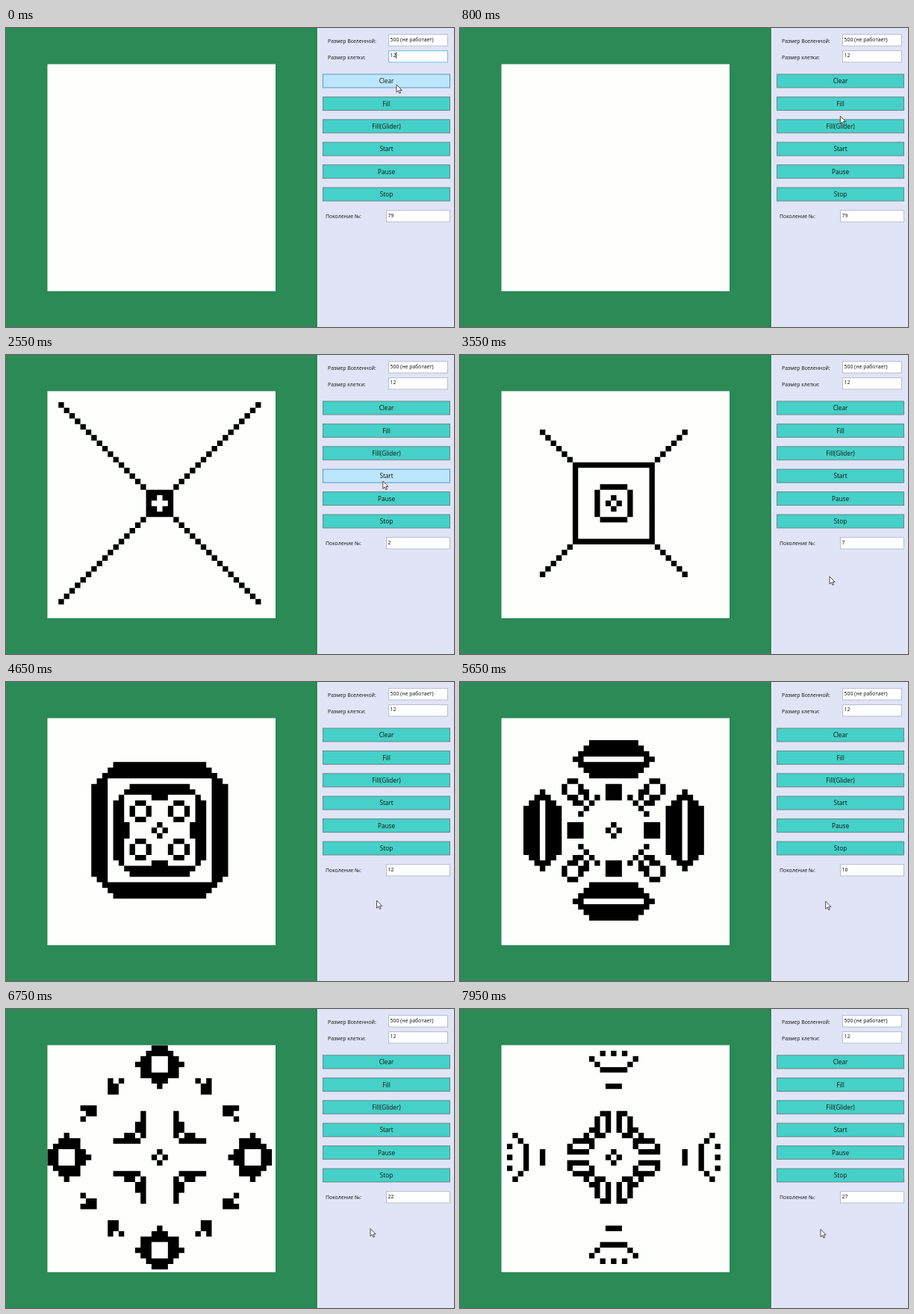
Animation of 600x401 px, one loop 8000 ms. Source, as an HTML page:

```html
<!DOCTYPE html>
<html lang="ru">
<head>
<meta charset="utf-8">
<title>Life</title>
<style>
  html, body { margin: 0; width: 100%; height: 100%; overflow: hidden; background: #2b8a55; }
  svg { display: block; width: 600px; height: 401px; }
  text { font-family: "Open Sans", "Noto Sans", sans-serif; font-size: 6.9px; fill: #111; }
  .btn { font-size: 8.2px; text-anchor: middle; }
</style>
</head>
<body>
<svg id="stage" viewBox="0 0 600 401">
  <rect width="600" height="401" fill="#2b8a55"/>
  <rect x="417" width="183" height="401" fill="#e0e4f6"/>
  <rect x="417" width="1" height="401" fill="#f4f6fb"/>
  <rect x="55.5" y="48.5" width="305.5" height="304.5" fill="#fdfffd"/>
  <path id="cells" fill="#000"/>
  <g id="panel"></g>
  <path id="arrow" d="M0 0V10.2L2.4 8L4 11.6L5.6 10.9L4 7.4H7.2Z"
        fill="#fff" stroke="#222" stroke-width=".8" stroke-linejoin="round"/>
</svg>
<script>
const LOOP = 8000;
const N = 41, CELL = 7.33, LEFT = 55.6, TOP = 48.7;
const FILL_AT = 1250, START_AT = 2044, TICK = 213, BLUR_AT = 300;
const GENS = Math.ceil((LOOP - START_AT) / TICK);

const $ = id => document.getElementById(id);
const panel = $('panel');

function add(tag, attrs, text) {
  const el = document.createElementNS('http://www.w3.org/2000/svg', tag);
  for (const k in attrs) el.setAttribute(k, attrs[k]);
  if (text) el.textContent = text;
  return panel.appendChild(el);
}

function field(x, y, w, text) {
  const box = add('rect', { x, y, width: w, height: 15.3, fill: '#fdfeff', stroke: '#b4b8c4', 'stroke-width': .9 });
  const label = add('text', { x: x + 2, y: y + 8.8 }, text);
  return { box, label };
}

add('text', { x: 431, y: 19.6 }, 'Размер Вселенной:');
add('text', { x: 431, y: 41.6 }, 'Размер клетки:');
add('text', { x: 428, y: 255.4 }, 'Поколение №:');
field(512.5, 8.7, 79, '500 (не работает)');
const size = field(512.5, 30.6, 79, '12');
const counter = field(509.5, 244.7, 85, '79');
const caret = add('rect', { x: 522.2, y: 32.3, width: .8, height: 8.6, fill: '#111' });

const buttons = ['Clear', 'Fill', 'Fill(Glider)', 'Start', 'Pause', 'Stop'].map((name, i) => {
  const y = 62 + i * 30.4;
  const box = add('rect', { x: 424.5, y, width: 170, height: 18, 'stroke-width': .9 });
  add('text', { x: 509.5, y: y + 12.2, class: 'btn' }, name);
  return { box, y };
});

// Conway's rule; everything outside the square counts as dead.
function step(grid) {
  const at = (x, y) => x >= 0 && y >= 0 && x < N && y < N ? grid[y * N + x] : 0;
  return grid.map((alive, i) => {
    const x = i % N, y = (i - x) / N;
    let sum = -alive;
    for (let dy = -1; dy <= 1; dy++)
      for (let dx = -1; dx <= 1; dx++) sum += at(x + dx, y + dy);
    return sum === 3 || (alive && sum === 2) ? 1 : 0;
  });
}

function outline(grid) {
  let d = '';
  for (let y = 0; y < N; y++) {
    for (let x = 0; x < N; x++) {
      if (!grid[y * N + x]) continue;
      const from = x;
      while (x + 1 < N && grid[y * N + x + 1]) x++;
      const w = (x - from + 1) * CELL;
      d += `M${(LEFT + from * CELL).toFixed(2)} ${(TOP + y * CELL).toFixed(2)}h${w.toFixed(2)}v${CELL}h${-w.toFixed(2)}z`;
    }
  }
  return d;
}

const boards = [];
let grid = Array.from({ length: N * N }, (_, i) => {
  const x = i % N, y = (i - x) / N;
  return x === y || x + y === N - 1 ? 1 : 0;
});
for (let g = 0; g <= GENS; g++) {
  boards.push(outline(grid));
  grid = step(grid);
}

// Pointer stops: time, x, y
const route = [
  [0, 523, 76], [450, 522, 76], [1000, 504, 136], [1500, 503, 137], [1850, 505, 165],
  [2500, 505, 166], [3050, 496, 294], [3550, 495, 297], [4300, 496, 293], [4650, 496.5, 293],
  [5400, 490, 294], [6400, 488, 294.5], [7000, 488, 294.5], [7800, 483, 295.5], [8000, 483, 295.5]
];

function pointer(t) {
  const i = Math.max(1, route.findIndex(p => p[0] > t));
  const [t0, x0, y0] = route[i - 1], [t1, x1, y1] = route[i];
  const k = (t - t0) / (t1 - t0), e = k * k * (3 - 2 * k);
  return [x0 + (x1 - x0) * e, y0 + (y1 - y0) * e];
}

function draw(t) {
  const gen = Math.max(0, Math.floor((t - START_AT) / TICK));
  $('cells').setAttribute('d', t < FILL_AT ? '' : boards[gen]);
  counter.label.textContent = gen || 79;

  const [x, y] = pointer(t);
  $('arrow').setAttribute('transform', `translate(${x} ${y})`);
  for (const b of buttons) {
    const over = y >= b.y && y <= b.y + 18;
    b.box.setAttribute('fill', over ? '#bce6fb' : '#45d0c8');
    b.box.setAttribute('stroke', over ? '#4a8fb8' : '#66807f');
  }

  const focused = t < BLUR_AT;
  size.box.setAttribute('stroke', focused ? '#6cb4e4' : '#b4b8c4');
  caret.setAttribute('visibility', focused ? 'visible' : 'hidden');
}

function loop() {
  draw(performance.now() % LOOP);
  requestAnimationFrame(loop);
}
loop();
</script>
</body>
</html>
```
